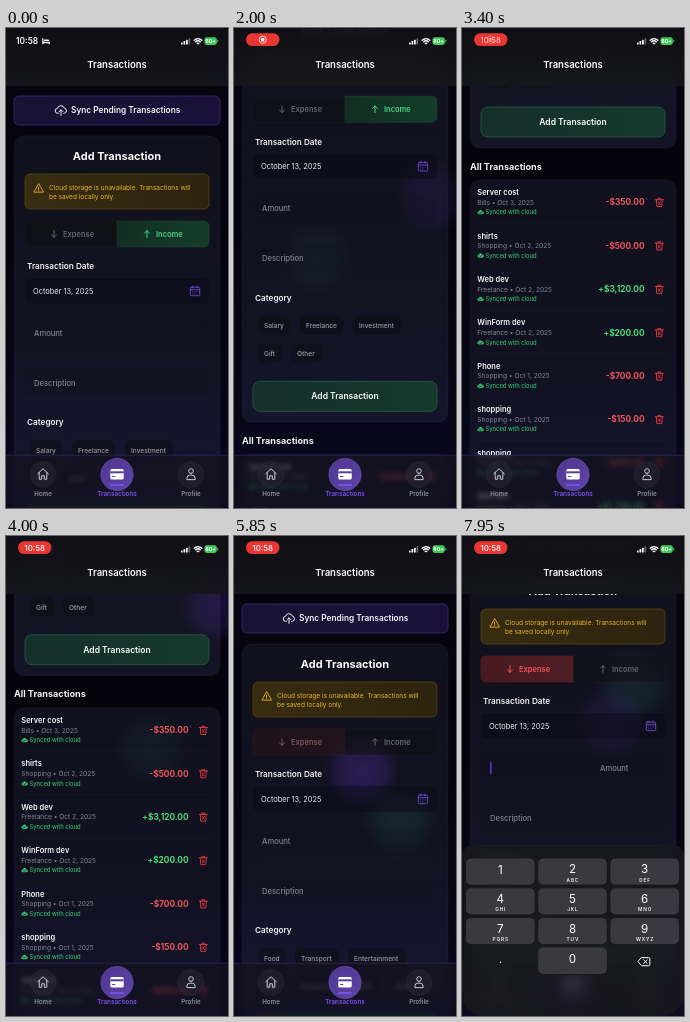
An HTML page with a canvas that plays this animation: 222x480 px, repeating every 8000 ms.

```html
<!DOCTYPE html>
<html lang="en">
<head>
<meta charset="utf-8">
<title>Transactions</title>
<style>
html, body { margin: 0; width: 100%; height: 100%; overflow: hidden; background: #05040d; }
canvas { display: block; width: 100vw; height: 100vh; }
</style>
</head>
<body>
<canvas id="stage"></canvas>
<script>
const W = 222, H = 480, LOOP = 8000;
const stage = document.getElementById('stage');
const main = stage.getContext('2d');
const page = document.createElement('canvas');
const under = page.getContext('2d');
let ctx = under, scale = 1;

const ICON = {
  up: 'M12 20V4M6 10l6-6 6 6',
  down: 'M12 4v16M6 14l6 6 6-6',
  upload: 'M7 18H6a4.5 4.5 0 0 1-.5-9A6.5 6.5 0 0 1 18 8.5 4.8 4.8 0 0 1 18 18h-1M12 22V12M8.5 15l3.5-3.5 3.5 3.5',
  warn: 'M12 3L2 21h20zM12 10v5M12 17.5v.6',
  date: 'M5 4.5h14a2 2 0 0 1 2 2V19a2 2 0 0 1-2 2H5a2 2 0 0 1-2-2V6.500a2 2 0 0 1 2-2zM3 9.500h18M8 2.500V6M16 2.500V6M7.500 13.500h.1M12 13.500h.1M16.500 13.500h.1M7.500 17.300h.1M12 17.300h.1',
  home: 'M3 11.5L12 3l9 8.5M5.5 9.5V21h4.2v-6h4.6v6h4.2V9.5',
  person: 'M12 11a4 4 0 1 0 0-8 4 4 0 0 0 0 8zM5 21v-2a5 5 0 0 1 5-5h4a5 5 0 0 1 5 5v2z',
  trash: 'M3 6h18M9 6V3h6v3M5.5 6l1 15h11l1-15M9.5 10.500l5 6.500M14.500 10.500l-5 6.500',
  cloud: 'M7 18.5a5 5 0 0 1-.5-10A6 6 0 0 1 18 9.5a4.5 4.5 0 0 1 0 9z',
  check: 'M9 13.5l2.2 2.2 4-4',
  erase: 'M8 5h12a2 2 0 0 1 2 2v10a2 2 0 0 1-2 2H8l-6-7zM11.5 9l6 6M17.5 9l-6 6',
  bed: 'M2 4h3v9h17v7h-3v-3H5v3H2zM7 7h10a4 4 0 0 1 4 4H7z',
  wifi: 'M2 9.5a14.5 14.5 0 0 1 20 0M6 13.8a8.7 8.7 0 0 1 12 0M10 18a3 3 0 0 1 4 0'
};
for (const k in ICON) ICON[k] = new Path2D(ICON[k]);

const ROWS = [
  ['Server cost', 'Bills • Oct 3, 2025', '-$350.00'],
  ['shirts', 'Shopping • Oct 2, 2025', '-$500.00'],
  ['Web dev', 'Freelance • Oct 2, 2025', '+$3,120.00'],
  ['WinForm dev', 'Freelance • Oct 2, 2025', '+$200.00'],
  ['Phone', 'Shopping • Oct 1, 2025', '-$700.00'],
  ['shopping', 'Shopping • Oct 1, 2025', '-$150.00'],
  ['shopping', 'Shopping • Oct 1, 2025', '-$450.00'],
  ['Web dev', 'Freelance • Oct 1, 2025', '+$1,200.00']
];
// label, left edge, width, row
const INCOME = [['Salary', 24, 32, 0], ['Freelance', 66, 43, 0], ['Investment', 119, 48, 0], ['Gift', 24, 24, 1], ['Other', 57, 32, 1]];
const EXPENSE = [['Food', 24, 28, 0], ['Transport', 61, 44, 0], ['Entertainment', 114, 58, 0], ['Bills', 24, 27, 1], ['Shopping', 60, 43, 1], ['Health', 112, 34, 1], ['Other', 155, 32, 1]];

const SCROLL = [[0, 0], [1350, 0], [1450, 9], [1900, 105], [2650, 245], [3400, 399], [3600, 404], [3850, 404], [4600, 108], [5150, 0], [7250, 0], [7650, 73], [8000, 73]];
// time, x, y, strength
const VIOLET = [[0, 230, 300, 0], [1450, 178, 200, .22], [2650, 225, 130, .05], [3400, 225, 60, 0], [4600, 187, 92, .5], [5850, 128, 235, .36], [7000, 100, 220, .2], [8000, 150, 185, .16]];
const TEAL = [[0, 40, 205, 0], [1450, 102, 185, .3], [2650, 60, 300, 0], [3400, 150, 320, 0], [4600, 140, 104, .35], [5850, 166, 285, .32], [7000, 190, 190, .25], [8000, 172, 148, .3]];

const clamp = v => Math.max(0, Math.min(1, v));
const ramp = (t, a, b) => clamp((t - a) / (b - a));
const easeOut = p => 1 - (1 - p) ** 3;

// monotone cubic through key points
function track(keys, t, col = 1) {
  const slope = i => i < 0 || i > keys.length - 2 ? 0 :
    (keys[i + 1][col] - keys[i][col]) / (keys[i + 1][0] - keys[i][0]);
  const tangent = i => {
    const a = slope(i - 1), b = slope(i);
    return a * b <= 0 ? 0 : 2 * a * b / (a + b);
  };
  let i = 0;
  while (i < keys.length - 2 && t >= keys[i + 1][0]) i++;
  const d = keys[i + 1][0] - keys[i][0], p = clamp((t - keys[i][0]) / d), q = 1 - p;
  return keys[i][col] * (1 + 2 * p) * q * q + keys[i + 1][col] * p * p * (3 - 2 * p) +
    d * p * q * (q * tangent(i) - p * tangent(i + 1));
}

function box(x, y, w, h, r, fill, line, lw = .7) {
  ctx.beginPath();
  ctx.roundRect(x, y, w, h, r);
  if (fill) { ctx.fillStyle = fill; ctx.fill(); }
  if (line) { ctx.strokeStyle = line; ctx.lineWidth = lw; ctx.stroke(); }
}
function disc(x, y, r, fill, line) { box(x - r, y - r, 2 * r, 2 * r, r, fill, line); }
function text(s, x, y, size, weight, color, align = 'left') {
  ctx.font = `${weight} ${size}px Inter, sans-serif`;
  ctx.textAlign = align;
  ctx.fillStyle = color;
  ctx.fillText(s, x, y + size * .36);
}
function icon(name, x, y, size, color, lw = .9, filled = false) {
  const k = size / 24;
  ctx.save();
  ctx.translate(x - size / 2, y - size / 2);
  ctx.scale(k, k);
  ctx.lineWidth = lw / k;
  ctx.lineCap = ctx.lineJoin = 'round';
  ctx.strokeStyle = ctx.fillStyle = color;
  filled ? ctx.fill(ICON[name]) : ctx.stroke(ICON[name]);
  ctx.restore();
}
function fade(x0, y0, x1, y1, ...colors) {
  const g = ctx.createLinearGradient(x0, y0, x1, y1);
  colors.forEach((c, i) => g.addColorStop(i / (colors.length - 1), c));
  return g;
}
function withAlpha(a, draw) {
  if (a <= 0) return;
  ctx.save();
  ctx.globalAlpha *= a;
  draw();
  ctx.restore();
}
function glow(keys, t, rgb, r) {
  const x = track(keys, t), y = track(keys, t, 2), a = track(keys, t, 3);
  const g = ctx.createRadialGradient(x, y, 0, x, y, r);
  g.addColorStop(0, `rgba(${rgb},${a})`);
  g.addColorStop(.6, `rgba(${rgb},${a * .65})`);
  g.addColorStop(1, `rgba(${rgb},0)`);
  ctx.fillStyle = g;
  ctx.fillRect(x - r, y - r, 2 * r, 2 * r);
}
// blurs what lies behind a panel, then tints it
function frost(source, x, y, w, h, r, blur, tint) {
  ctx.save();
  ctx.beginPath();
  ctx.roundRect(x, y, w, h, r);
  ctx.clip();
  ctx.filter = `blur(${blur * scale}px)`;
  ctx.drawImage(source, 0, 0, W, H);
  ctx.filter = 'none';
  ctx.fillStyle = tint;
  ctx.fillRect(x, y, w, h);
  ctx.restore();
}

function toggle(t) {
  const red = ramp(t, 5770, 6080), green = 1 - ramp(t, 5680, 5800);
  box(19, 193, 184, 26, 5, 'rgba(15,15,22,.6)', 'rgba(255,255,255,.03)');
  withAlpha(red, () => box(19, 193, 92, 26, [5, 0, 0, 5], fade(19, 0, 111, 0, '#471a21', '#4f1c24'), '#5c2129', .5));
  withAlpha(green, () => box(111, 193, 92, 26, [0, 5, 5, 0], fade(111, 0, 203, 0, '#123324d8', '#14452ed8'), '#1a4a32', .5));
  const side = (name, label, x, on, color) => {
    [[1 - on, '#64646d'], [on, color]].forEach(([a, c]) => withAlpha(a, () => {
      icon(name, x, 206, 10, c, 1);
      text(label, x + 9, 206, 7.5, 600, c);
    }));
  };
  side('down', 'Expense', 48, red, '#f25555');
  side('up', 'Income', 141, green, '#45d483');
}

function form(t) {
  box(8, 68, 206, 29, 5, fade(8, 0, 214, 0, '#181334', '#1a123a'), '#38266b', .9);
  icon('upload', 55, 82, 13, '#f0f0f6', 1);
  text('Sync Pending Transactions', 65, 82.5, 8.3, 600, '#f4f4f8');

  box(8, 108, 206, 411, 10, fade(0, 108, 0, 519, 'rgba(72,76,100,.18)', 'rgba(72,76,115,.19)', 'rgba(70,76,120,.22)'), 'rgba(110,110,170,.1)');
  text('Add Transaction', 111, 128, 11, 700, '#fafafa', 'center');

  box(19, 146, 184, 35, 5, fade(19, 0, 203, 0, '#382c11', '#2d240f'), '#604a14');
  icon('warn', 32.5, 160, 11, '#e9ae1e', .9);
  text('Cloud storage is unavailable. Transactions will', 43, 159.3, 6.5, 400, '#e8b42c');
  text('be saved locally only.', 43, 168.8, 6.5, 400, '#e8b42c');

  toggle(t);

  text('Transaction Date', 21, 238.4, 8.2, 600, '#f2f2f5');
  box(19, 250, 184, 26, 5, 'rgba(10,10,20,.45)', 'rgba(255,255,255,.02)');
  text('October 13, 2025', 27, 263.5, 7.45, 400, '#ececf0');
  icon('date', 189, 263, 12.5, '#6d49d2', .9);

  const slide = easeOut(ramp(t, 7350, 7700));
  for (const y of [290, 340]) box(19, y, 184, 30, 5, 'rgba(12,12,22,.12)', 'rgba(255,255,255,.01)');
  text('Amount', 28 + 110 * slide, 305.4, 7.6, 500, '#83838d');
  if (t > 7350) box(28.3, 299, 1.2, 12, .6, '#6a4be0');
  text('Description', 28, 355.2, 7.6, 500, '#83838d');

  text('Category', 21, 394.5, 8.2, 600, '#f2f2f5');
  for (const [label, x, w, row] of t < 5700 ? INCOME : EXPENSE) {
    const y = 412 + row * 28;
    box(x, y, w, 20, 6, 'rgba(13,13,18,.5)', 'rgba(255,255,255,.02)');
    text(label, x + 6, y + 10.4, 6.6, 500, '#9999a3');
  }
  box(19, 478, 184, 30, 7, fade(19, 0, 203, 0, '#15302a', '#15382c'), '#25573f', .9);
  text('Add Transaction', 111, 493, 8.5, 600, '#fafafa', 'center');
}

function list() {
  text('All Transactions', 8, 537.3, 9.1, 700, '#f6f6f8');
  box(8, 551, 206, 400, 9, 'rgba(66,70,104,.19)', 'rgba(110,110,170,.1)');
  ROWS.forEach(([name, info, sum], i) => {
    const y = 564 + i * 43.4;
    const color = sum[0] === '-' ? '#f0555a' : '#4bdc7b';
    text(name, 15.3, y - .4, 7.5, 600, '#f6f6f8');
    text(info, 15.3, y + 9.5, 6.6, 400, '#85858f');
    icon('cloud', 18.6, y + 19.3, 7.5, '#32b866', 1, true);
    icon('check', 18.6, y + 19.3, 7.5, '#14141f', .7);
    text('Synced with cloud', 23.5, y + 19.3, 5.8, 500, '#32b866');
    text(sum, 182.5, y + 9.5, 8.3, 700, color, 'right');
    icon('trash', 197.3, y + 9.5, 11, '#e43a40', .9);
    if (i) box(15, y - 13, 192, .5, 0, 'rgba(255,255,255,.03)');
  });
}

function paintPage(t) {
  ctx = under;
  ctx.fillStyle = fade(0, 0, 0, H, '#07050f', '#05040d', '#060511', '#0a0820');
  ctx.fillRect(0, 0, W, H);
  glow(TEAL, t, '18,84,76', 38);
  glow(VIOLET, t, '92,44,190', 38);
  ctx.save();
  ctx.translate(0, -track(SCROLL, t));
  form(t);
  list();
  ctx.restore();
}

function header() {
  frost(page, 0, 0, W, 58, 0, 8, fade(0, 0, 0, 58, 'rgba(15,15,20,.93)', 'rgba(21,21,28,.93)'));
  text('Transactions', 111, 37, 9.5, 600, '#fafafa', 'center');
}

function status(t) {
  const pill = ramp(t, 450, 650), clock = ramp(t, 3250, 3480);
  withAlpha(1 - pill, () => {
    text('10:58', 10, 13.3, 8.4, 600, '#fff');
    icon('bed', 40, 13.3, 9, '#fff', 1, true);
  });
  withAlpha(pill, () => {
    box(12, 5.2, 33.5, 12.8, 6.4, '#e83632');
    withAlpha(1 - clock, () => {
      disc(28.7, 11.7, 3.6, null, '#fff');
      disc(28.7, 11.7, 1.9, '#fff');
    });
    withAlpha(clock, () => text('10:58', 28.7, 11.8, 7.9, 500, '#fff', 'center'));
  });
  for (let i = 0; i < 4; i++) {
    const h = 2 + i * 1.35;
    box(175 + i * 2.5, 16.4 - h, 1.7, h, .5, i < 3 ? '#fff' : '#66666c');
  }
  icon('wifi', 192, 13.2, 9, '#fff', 1.4);
  box(198.5, 9.3, 12.3, 7.6, 2.3, '#3ccb57');
  box(211.2, 11.7, .9, 2.8, .5, '#3ccb57');
  text('80+', 204.6, 13.1, 5.4, 700, '#fff', 'center');
}

function nav() {
  frost(page, 0, 427, W, 53, 0, 2.4, fade(0, 427, 0, H, 'rgba(20,18,29,.68)', 'rgba(17,15,29,.62)'));
  box(0, 426.7, W, .7, 0, 'rgba(95,70,165,.4)');

  const tab = (name, label, x) => {
    disc(x, 446.5, 13, 'rgba(40,39,52,.55)', 'rgba(255,255,255,.05)');
    icon(name, x, 446, 14, '#c9c9d2', 1);
    text(label, x, 465.5, 6.2, 600, '#8f8f9b', 'center');
  };
  tab('home', 'Home', 37);
  tab('person', 'Profile', 185);

  disc(111, 446.5, 16.2, fade(100, 432, 122, 462, '#4f3892', '#5d43a6'), '#644aae');
  box(104.3, 441, 13.4, 10.6, 1.6, '#fff');
  box(104.3, 443.3, 13.4, 2, 0, '#563e9c');
  box(106, 448, 3.3, 1.1, .3, '#563e9c');
  box(104, 456.2, 14, 1.5, .7, '#8358f5');
  text('Transactions', 111, 465.5, 6.3, 600, '#7b50f0', 'center');
}

function keyboard(t) {
  const p = easeOut(ramp(t, 7200, 7650));
  if (!p) return;
  const drop = 172 * (1 - p), corners = [11, 11, 22, 22];
  frost(stage, 0, 309.5 + drop, W, 170, corners, 7, 'rgba(25,25,30,.84)');
  ctx.save();
  ctx.translate(0, drop);
  box(0, 309.5, W, 170, corners, null, 'rgba(255,255,255,.05)', .5);
  const letters = ['', 'ABC', 'DEF', 'GHI', 'JKL', 'MNO', 'PQRS', 'TUV', 'WXYZ'];
  const key = (n, col, row, sub) => {
    const x = 4 + col * 72.2, y = 322.5 + row * 29.7;
    box(x, y + .6, 68.7, 26.3, 5, '#111115');
    box(x, y, 68.7, 26.3, 5, '#39393f');
    text(n, x + 34.3, y + (sub ? 10.5 : 11.2), 11.6, 400, '#fff', 'center');
    if (sub) {
      ctx.letterSpacing = '0.8px';
      text(sub, x + 34.7, y + 21.5, 4.8, 600, '#f0f0f2', 'center');
      ctx.letterSpacing = '0px';
    }
  };
  letters.forEach((sub, i) => key(String(i + 1), i % 3, Math.floor(i / 3), sub));
  key('0', 1, 3);
  text('.', 38.3, 422.5, 11.6, 400, '#fff', 'center');
  icon('erase', 182, 425.7, 14, '#fff', 1);
  ctx.restore();
}

function resize() {
  const ratio = devicePixelRatio || 1;
  scale = innerWidth / W * ratio;
  for (const c of [stage, page]) {
    c.width = Math.round(innerWidth * ratio);
    c.height = Math.round(innerHeight * ratio);
    c.getContext('2d').setTransform(c.width / W, 0, 0, c.height / H, 0, 0);
  }
}

function draw() {
  const t = performance.now() % LOOP;
  paintPage(t);
  ctx = main;
  ctx.drawImage(page, 0, 0, W, H);
  header();
  nav();
  keyboard(t);
  status(t);
  requestAnimationFrame(draw);
}

addEventListener('resize', resize);
resize();
draw();
</script>
</body>
</html>
```
